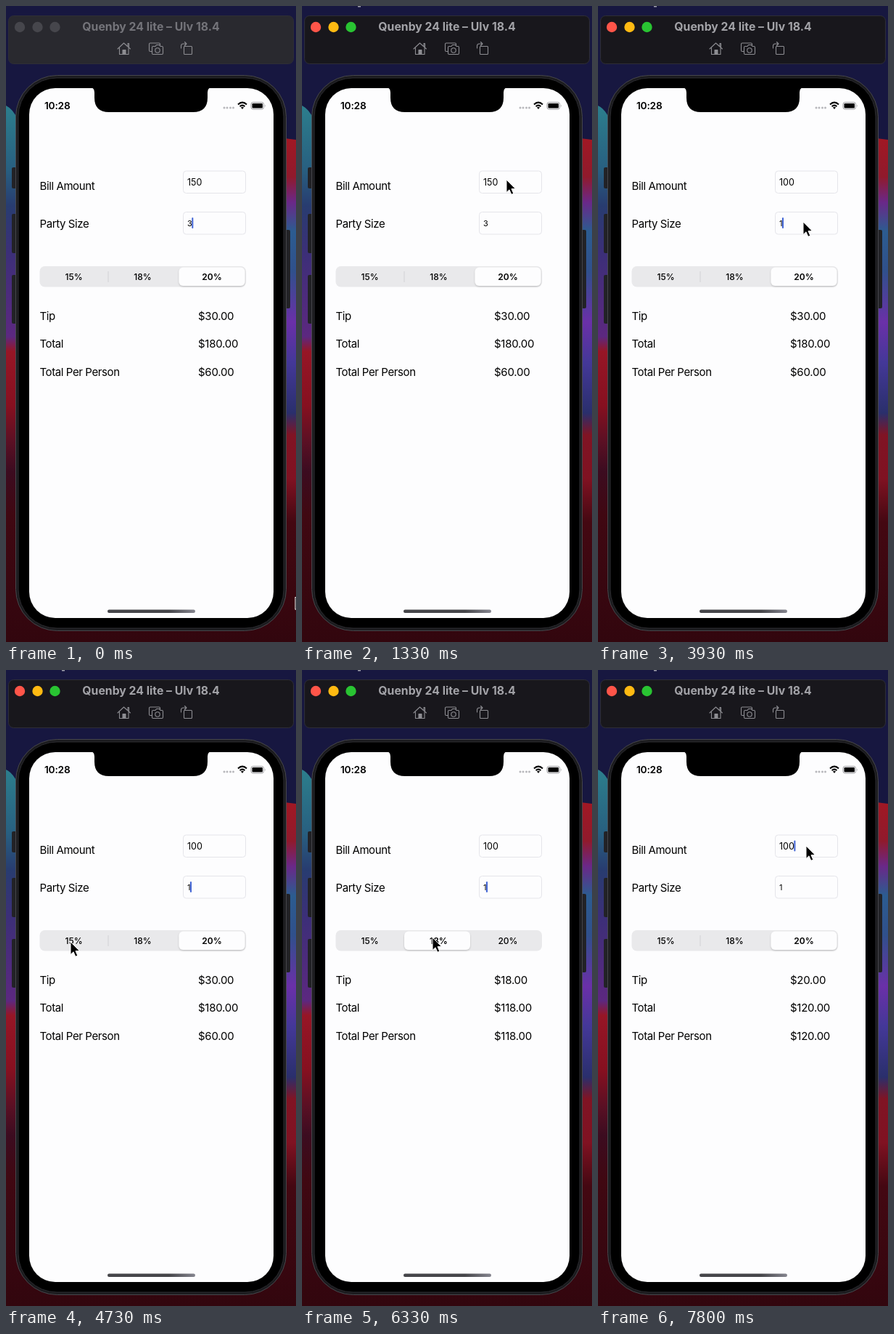
Recreate the animation shown at these times as an HTML page. Size 400 by 875 pixels, loop 8 s.

```html
<!DOCTYPE html>
<html lang="en">
<head>
<meta charset="utf-8">
<title>Tip calculator</title>
<style>
html, body { margin: 0; width: 100%; height: 100%; overflow: hidden; background: #15153a; }
svg { display: block; width: 100vw; height: 100vh; font-family: Inter, "Open Sans", sans-serif; }
.body { font-size: 15px; letter-spacing: -.4px; }
.amount { letter-spacing: -.25px; }
.segment { font-size: 12px; font-weight: 500; text-anchor: middle; }
.icon { fill: none; stroke: #8d8d92; stroke-width: 1.1; stroke-linejoin: round; stroke-linecap: round; }
</style>
</head>
<body>
<svg viewBox="0 0 400 875">
  <defs>
    <linearGradient id="left" gradientUnits="userSpaceOnUse" x1="0" y1="0" x2="0" y2="875"></linearGradient>
    <linearGradient id="right" gradientUnits="userSpaceOnUse" x1="0" y1="0" x2="0" y2="875"></linearGradient>
    <linearGradient id="homeBar">
      <stop offset=".7" stop-color="#454549"/><stop offset="1" stop-color="#85858f"/>
    </linearGradient>
    <filter id="shadow" x="-10%" y="-20%" width="120%" height="150%">
      <feDropShadow dx="0" dy="1.2" stdDeviation="1" flood-color="#000" flood-opacity=".2"/>
    </filter>
  </defs>

  <!-- Desktop -->
  <rect width="400" height="875" fill="#171740"/>
  <path d="M0 137Q10 142 16 156V800H200V875H0Z" fill="url(#left)"/>
  <path d="M384 182L400 184V875H200V800H384Z" fill="url(#right)"/>
  <rect id="menuText" x="77" width="4" height="1.5" fill="#a0a0ac"/>

  <!-- Window bar -->
  <rect id="bar" x="3.5" y="13.5" width="393" height="66" rx="7" stroke="#2e2e36"/>
  <g id="lights"><circle cx="19" cy="29" r="7.2"/><circle cx="43.5" cy="29" r="7.2"/><circle cx="67.5" cy="29" r="7.2"/></g>
  <text id="title" x="200" y="34" text-anchor="middle" font-size="15.8" font-weight="700">Quenby 24 lite – Ulv 18.4</text>
  <g class="icon">
    <path d="M154 59L162.500 51L171.500 59M156.500 58V66.500H169V58M168 55V51.500H169.500V56.500"/>
    <rect x="161" y="60.500" width="4" height="6" fill="#8d8d92"/>
    <path d="M201 62.500H199Q197.500 62.500 197.500 61V52.500Q197.500 51 199 51H211Q212.500 51 212.500 52.500V54"/>
    <path d="M203 55.500H206L207.500 53.500H211.500L213 55.500H215Q216.500 55.500 216.500 57V65Q216.500 66.500 215 66.500H203Q201.500 66.500 201.500 65V57Q201.500 55.500 203 55.500Z"/>
    <circle cx="209" cy="61" r="3.200"/>
    <rect x="245.500" y="55.500" width="11" height="11" rx="1"/>
    <path d="M241.500 58V55Q241.500 52 244.500 52H249M246.500 49.500L249 52L246.500 54.500"/>
  </g>

  <!-- Phone -->
  <g fill="#222226">
    <rect x="8" y="222" width="8" height="29" rx="2"/><rect x="8" y="286" width="8" height="54" rx="2"/>
    <rect x="8" y="370" width="8" height="67" rx="2"/><rect x="384" y="308" width="8" height="108" rx="2"/>
  </g>
  <rect x="13.500" y="95.500" width="373" height="764" rx="57" fill="#1b1b1e" stroke="#47474c"/>
  <rect x="17" y="99" width="366" height="757" rx="53" fill="#000" stroke="#2c2c30"/>
  <rect x="32" y="113" width="337" height="729" rx="36" fill="#fdfdfe"/>
  <path d="M117 112Q122 113 122 119V126Q122 146 142 146H258Q278 146 278 126V119Q278 113 283 112Z"/>
  <rect x="140" y="830.500" width="121" height="4.500" rx="2.200" fill="url(#homeBar)"/>

  <!-- Status bar -->
  <text x="53" y="142" font-size="13.700" font-weight="600" letter-spacing="-.2">10:28</text>
  <g fill="#b8b8bc"><circle cx="301" cy="140" r="1.500"/><circle cx="305" cy="140" r="1.500"/><circle cx="309.500" cy="140" r="1.500"/><circle cx="313.500" cy="140" r="1.500"/></g>
  <path d="M320 135.500Q326 129.800 332 135.500M322.600 138.200Q326 135 329.400 138.200" fill="none" stroke="#000" stroke-width="2"/>
  <path d="M324 139.600Q326 138 328 139.600L326 142Z"/>
  <rect x="338" y="132.500" width="17.500" height="9.500" rx="2.700" fill="none" stroke="#9a9a9e"/>
  <rect x="339.500" y="134" width="14.500" height="6.500" rx="1.300"/>
  <path d="M357 135.500Q358.500 137.200 357 139Z" fill="#9a9a9e"/>

  <!-- Form -->
  <g class="body">
    <text x="46.500" y="253">Bill Amount</text><text x="46.500" y="304.500">Party Size</text>
    <text x="46.500" y="432">Tip</text><text x="46.500" y="470">Total</text><text x="46.500" y="508.500">Total Per Person</text>
    <g class="amount"><text id="tip" x="265" y="432"/><text id="total" x="265" y="470"/><text id="share" x="265" y="508.500"/></g>
  </g>
  <g fill="#fdfdfe" stroke="#e5e5ea">
    <rect x="244.500" y="227" width="86" height="30.500" rx="4"/><rect x="244.500" y="283.500" width="86" height="30.500" rx="4"/>
  </g>
  <text id="bill" x="250" y="246.500" font-size="12.500"/>
  <text id="party" x="250" y="303" font-size="11"/>
  <rect id="caret" width="2" height="15" rx="1" fill="#4063d4"/>

  <!-- Tip rate -->
  <rect x="46.500" y="358" width="284.500" height="28.500" rx="7" fill="#e9e9eb"/>
  <g fill="#d2d2d6"><rect id="divider0" x="140.500" y="365" width="1" height="15"/><rect id="divider1" x="236" y="365" width="1" height="15"/></g>
  <rect id="thumb" y="359.500" width="91" height="25.500" rx="6" fill="#fdfdfe" filter="url(#shadow)"/>
  <g class="segment"><text x="93.500" y="377">15%</text><text x="188.500" y="377">18%</text><text x="284" y="377">20%</text></g>

  <path id="cursor" d="M0 0V17.500L4 13.800L6.800 20.300L9.800 19L7 12.600H12.500Z" stroke="#fff" stroke-width="1"/>
</svg>
<script>
const LOOP = 8000;
const $ = id => document.getElementById(id);

function fillGradient(id, stops) {
  $(id).innerHTML = stops.map(([y, color]) =>
    `<stop offset="${y / 875}" stop-color="${color}"/>`).join("");
}
fillGradient("left", [[140, "#2c7d8c"], [225, "#285f80"], [275, "#283c70"], [340, "#3c2f78"],
  [455, "#5c2880"], [475, "#961626"], [550, "#861020"], [600, "#5a1024"], [640, "#3c0c20"], [700, "#400812"], [875, "#32060e"]]);
fillGradient("right", [[183, "#a01824"], [235, "#901a2c"], [270, "#6a2888"], [310, "#2c5c90"],
  [365, "#30508c"], [435, "#6a30a8"], [490, "#443898"], [560, "#2a2f6c"], [590, "#801424"], [650, "#801222"], [710, "#440812"], [875, "#32060e"]]);

// Each track holds [time, value...] entries.
const cursorPath = [
  [0, 399, 813], [70, 399, 813], [200, 403, 815], [400, 403, 815], [950, 292, 262], [1200, 284, 240],
  [1330, 282, 239], [1670, 275, 264], [3070, 275, 264], [3130, 275, 270], [3450, 283, 297], [4140, 283, 297],
  [4730, 89, 374], [5070, 89, 374], [5330, 102, 365], [5620, 176, 371], [6000, 176, 371],
  [6330, 180, 368], [6600, 279, 372], [6870, 279, 372], [7400, 288, 244], [7530, 287, 242]
];
const billText = [[0, "150"], [2070, "15"], [2270, "1"], [2470, ""], [2730, "1"], [2870, "10"], [3130, "100"]];
const partyText = [[0, "3"], [3870, ""], [3930, "1"]];
const focus = [[0, "party"], [1130, ""], [1470, "bill"], [3530, "party"], [7530, ""], [7730, "bill"]];
const choices = [[0, 2], [4800, 0], [5670, 1], [6600, 2]];
const results = [[0, 30, 180, 60], [4800, 15, 115, 115], [5670, 18, 118, 118], [6600, 20, 120, 120]];
const activation = 1130;
const thumbX = [49, 141, 238.5];
const labels = [...document.querySelectorAll(".segment text")];

const indexAt = (track, t) => track.findLastIndex(entry => entry[0] <= t);
const valueAt = (track, t) => track[indexAt(track, t)][1];
const easeOut = p => 1 - (1 - p) ** 3;
const mix = (a, b, p) => a + (b - a) * p;

function setAttributes(id, values) {
  for (const name in values) $(id).setAttribute(name, values[name]);
}

// Monotone cubic: passes through each point without overshoot and rests between equal ones.
function smoothAt(track, t, axis) {
  const rate = i => track[i] && track[i + 1]
    ? (track[i + 1][axis] - track[i][axis]) / (track[i + 1][0] - track[i][0]) : 0;
  const tangent = i => {
    const before = rate(i - 1), after = rate(i);
    return before * after > 0 ? 2 * before * after / (before + after) : 0;
  };
  const i = indexAt(track, t);
  const start = track[i], end = track[i + 1];
  if (!end) return start[axis];
  const span = end[0] - start[0], p = (t - start[0]) / span;
  return mix(start[axis], end[axis], p * p * (3 - 2 * p))
    + span * p * (1 - p) * (tangent(i) * (1 - p) - tangent(i + 1) * p);
}

function moveCursor(t) {
  const [x, y] = [1, 2].map(axis => smoothAt(cursorPath, t, axis));
  setAttributes("cursor", { transform: `translate(${x} ${y})` });
}

function drawWindow(active) {
  const colors = active ? ["#ff5549", "#ffba12", "#29c432"] : Array(3).fill("#46464c");
  [...$("lights").children].forEach((light, i) => light.setAttribute("fill", colors[i]));
  setAttributes("bar", { fill: active ? "#18171c" : "#29292f" });
  setAttributes("title", { fill: active ? "#a3a3a8" : "#74747a" });
  setAttributes("menuText", { opacity: +active });
}

function drawFields(t) {
  $("bill").textContent = valueAt(billText, t);
  $("party").textContent = valueAt(partyText, t);
  const field = valueAt(focus, t);
  setAttributes("caret", { opacity: +!!field });
  if (field) setAttributes("caret", {
    x: 249.5 + $(field).getComputedTextLength(),
    y: field === "bill" ? 234.5 : 291
  });
}

function drawSegments(t) {
  const i = indexAt(choices, t);
  const [start, choice] = choices[i];
  const previous = i ? choices[i - 1][1] : choice;
  const p = easeOut(Math.min(1, (t - start) / 230));
  setAttributes("thumb", { x: mix(thumbX[previous], thumbX[choice], p) });
  labels.forEach((label, n) => label.style.fontWeight = n === choice ? 600 : 500);
  setAttributes("divider0", { opacity: +(choice === 2) });
  setAttributes("divider1", { opacity: +(choice === 0) });
}

function drawResults(t) {
  const amounts = results[indexAt(results, t)].slice(1);
  ["tip", "total", "share"].forEach((id, i) => $(id).textContent = "$" + amounts[i].toFixed(2));
}

function render(now) {
  const t = now % LOOP;
  drawWindow(t >= activation);
  drawFields(t);
  drawSegments(t);
  drawResults(t);
  moveCursor(t);
  requestAnimationFrame(render);
}
render(0);
</script>
</body>
</html>
```
